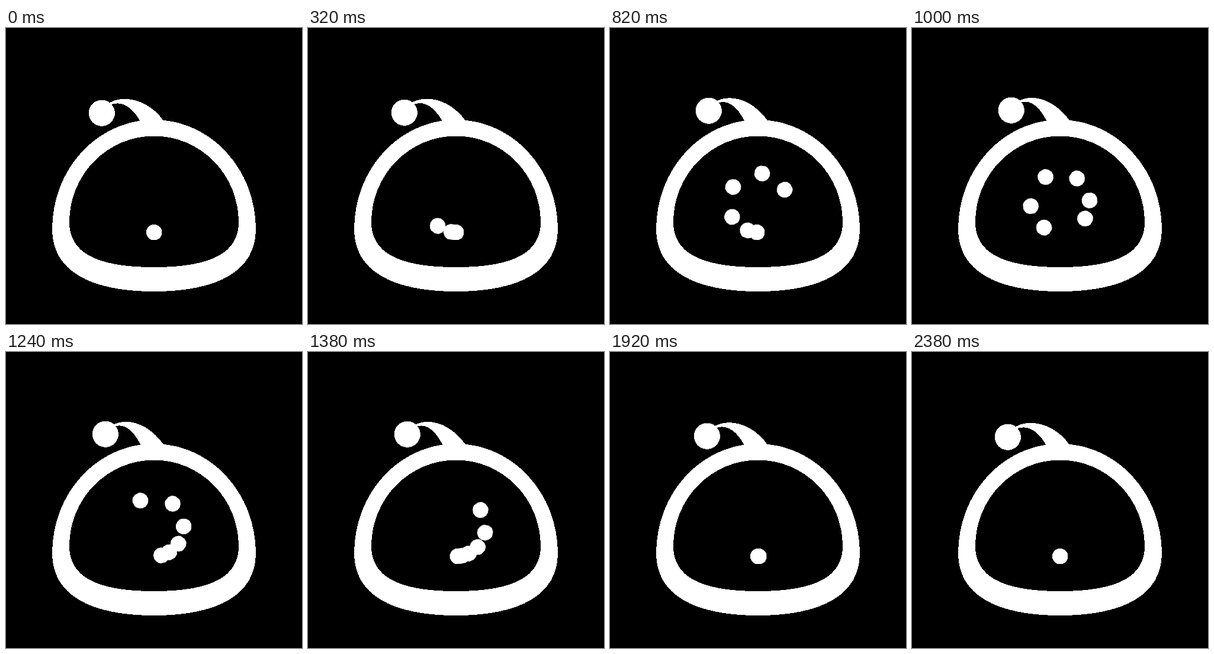
Recreate the animation shown at these times as an HTML page. Size 500x500 px, loop 2400 ms.

```html
<!DOCTYPE html>
<html lang="en">
<head>
<meta charset="utf-8">
<title>Loader</title>
<style>
  html, body { margin: 0; width: 100%; height: 100%; overflow: hidden; background: #000; }
  svg { display: block; width: 100%; height: 100%; fill: #fff; shape-rendering: crispEdges; }
  .ball { animation: lift 2400ms ease-in-out infinite; }
  .stalk { animation: bend 2400ms ease-in-out infinite; }
  .dot { transform-origin: 250.2px 295.2px; }
  @keyframes lift {
    50% { transform: translate(6.1px, -4.9px); }
  }
  @keyframes bend {
    0%, 100% { d: path("M170 130 C190 112 238 116 267 158 L228 160 C215 135 195 119 172 132 Z"); }
    50% { d: path("M176 126 C198 110 238 116 267.5 158 L229 160 C217 135 200 116 178 128 Z"); }
  }
</style>
</head>
<body>
<svg viewBox="0 0 500 500">
  <path class="stalk" d="M170 130 C190 112 238 116 267 158 L228 160 C215 135 195 119 172 132 Z"/>
  <circle class="ball" cx="161.8" cy="143.7" r="22.1"/>
  <path fill-rule="evenodd" d="M78 340 A172 185 0 0 1 422 340 C422 410 358 445 250 445 S78 410 78 340 Z
    M107 328 A143 145.5 0 0 1 393 328 C393 378 350 404 250 404 S107 378 107 328 Z"/>
  <g id="dots"></g>
</svg>
<script>
  const loop = 2400, count = 6;
  const dots = document.getElementById('dots');
  const spin = deg => `rotate(${deg}deg)`;

  for (let i = 0; i < count; i++) {
    const dot = document.createElementNS('http://www.w3.org/2000/svg', 'circle');
    dot.setAttribute('class', 'dot');
    dot.setAttribute('cx', 250.2);
    dot.setAttribute('cy', 345.2);
    dot.setAttribute('r', 13.3);
    dots.append(dot);

    // Later dots start closer together, turn faster and settle more softly.
    const start = 161.5 * i - 2.45 * i * i;
    const end = start + 1512 - 50 * i;
    const easing = `cubic-bezier(${0.415 + 0.006 * i}, 0, ${0.44 - 0.016 * i}, 1)`;
    dot.animate([
      { transform: spin(0), offset: 0 },
      { transform: spin(0), offset: start / loop, easing },
      { transform: spin(360), offset: end / loop },
      { transform: spin(360), offset: 1 }
    ], { duration: loop, iterations: Infinity });
  }
</script>
</body>
</html>
```
